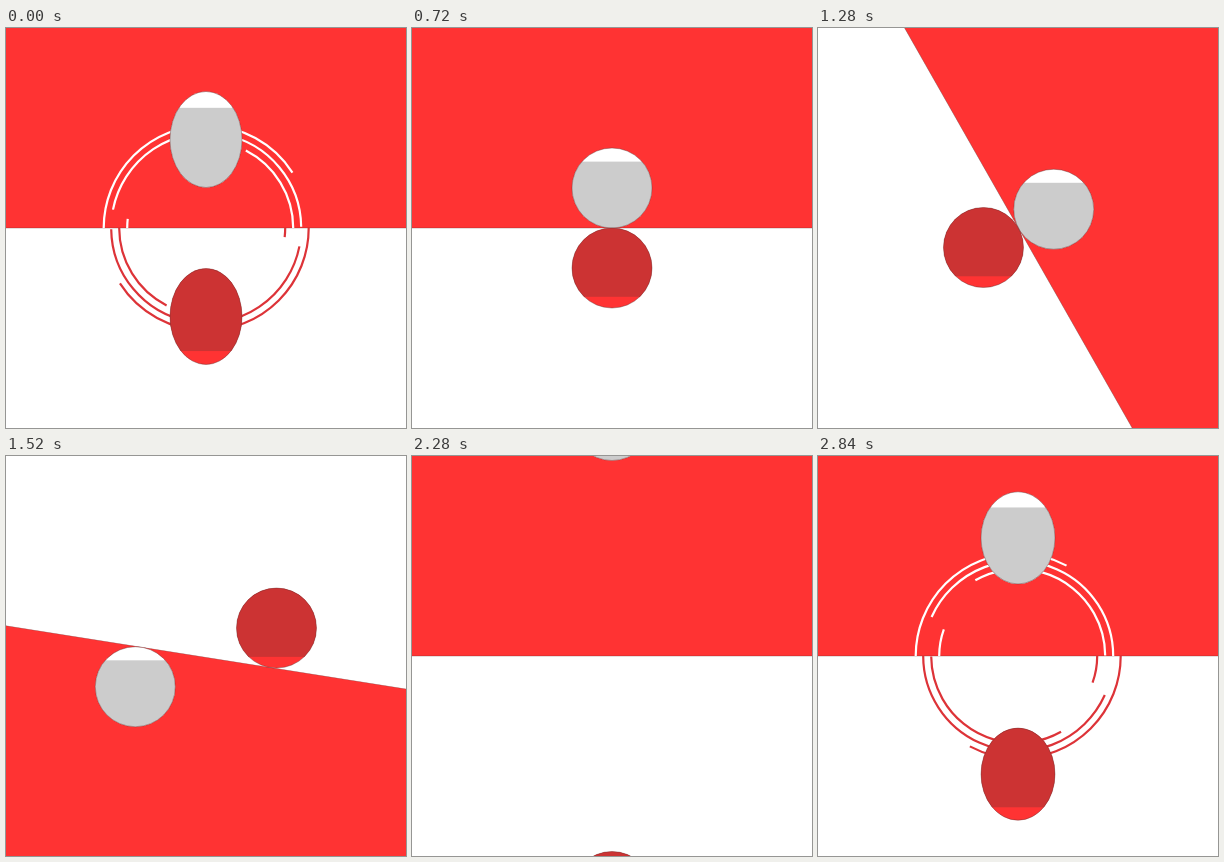
These frames come from a looping animation (400x400 px, 2.88 s). An HTML page with a canvas:

```html
<!DOCTYPE html>
<html lang="en">
<head>
<meta charset="utf-8">
<title>Two balls on a turning line</title>
<style>
  html, body { margin: 0; width: 100%; height: 100%; overflow: hidden; background: #fff; }
  canvas { display: block; width: 400px; height: 400px; }
</style>
</head>
<body>
<canvas id="stage" width="400" height="400"></canvas>
<script>
const ctx = document.getElementById('stage').getContext('2d');
const LOOP = 2880, STEP = 40;
const RADIUS = 40;
const PIVOT = .7;        // the line turns about a point just below its rest height
const DROP = 2240;       // the fall and the rings run on a clock starting here
const ROLL = 720, SWING = 960, EXIT = 1960;
const RED = '#f33', DARK_RED = '#c33', RING_RED = '#dd3338', GREY = '#ccc';
const EDGE = 'rgba(90,45,45,.5)';

// Each ring arc sweeps half a turn; its tail follows its head.
const RINGS = [
  { r: 79, dir: -1, head: -100, tail: 253 },
  { r: 87, dir: 1, head: 2, tail: 346 },
  { r: 95, dir: -1, head: 157, tail: 536 },
  { r: 102.5, dir: 1, head: 214, tail: 596 },
];
const HEAD_SWEEP = 720, TAIL_SWEEP = 550;

const clamp = x => Math.min(1, Math.max(0, x));
const mix = (a, b, p) => a + (b - a) * p;
const sineInOut = p => (1 - Math.cos(Math.PI * p)) / 2;
const quadOut = p => 1 - (1 - p) ** 2;
const quintInOut = p => p < .5 ? 16 * p ** 5 : 1 - 16 * (1 - p) ** 5;

// Tilt of the dividing line in radians.
function tiltAt(t) {
  if (t <= ROLL || t >= EXIT) return 0;
  const s = t - SWING;
  let degrees;
  if (s < 0) degrees = -2 * sineInOut((t - ROLL) / (SWING - ROLL));
  else if (s < 650) degrees = -2 + 6.09e-4 * s * s;
  else degrees = 360 - 104.7 * ((1000 - s) / 350) ** 2.62;
  return degrees * Math.PI / 180;
}

// Position of the upper ball along the line.
function rollAt(t) {
  if (t < SWING) return -30.5 * sineInOut((t - ROLL) / (SWING - ROLL));
  return -30.5 + 305 * ((t - SWING) / 1000) ** 2;
}

// Scale and bottom edge of the upper ball while it falls and lands.
function fallAt(u) {
  const impact = 683, squashed = 783, rest = 1080;
  if (u < impact) {
    const p = Math.max(0, (u - 40) / 600);
    const stretch = .2 * p ** 4;
    return { sx: 1 - stretch / 2, sy: 1 + stretch, bottom: Math.min(200, 4.5 + 155 * p ** 3.3) };
  }
  const hit = quadOut(clamp((u - impact) / (squashed - impact)));
  const back = quadOut(clamp((u - squashed) / (rest - squashed)));
  return {
    sx: u < squashed ? mix(.885, 1.16, hit) : mix(1.16, 1, back),
    sy: u < squashed ? mix(1.23, .84, hit) : mix(.84, 1, back),
    bottom: 200,
  };
}

function drawHalves(tilt) {
  ctx.fillStyle = '#fff';
  ctx.fillRect(0, 0, 400, 400);
  ctx.save();
  ctx.translate(200, 200 + PIVOT);
  ctx.rotate(tilt);
  ctx.translate(0, -PIVOT);
  ctx.fillStyle = RED;
  ctx.fillRect(-400, -400, 800, 400);
  ctx.fillStyle = EDGE;
  ctx.fillRect(-400, -.3, 800, .6);
  ctx.restore();
}

function drawRings(u) {
  ctx.lineWidth = 2.2;
  for (const { r, dir, head, tail } of RINGS) {
    const h = quintInOut(clamp((u - head) / HEAD_SWEEP));
    const g = quintInOut(clamp((u - tail) / TAIL_SWEEP));
    if (h - g < .006) continue;
    const [from, to] = dir > 0 ? [g, h] : [1 - h, 1 - g];
    for (const turn of [1, 0]) {
      ctx.strokeStyle = turn ? '#fff' : RING_RED;
      ctx.beginPath();
      ctx.arc(200.2, 200, r, Math.PI * (turn + from), Math.PI * (turn + to));
      ctx.stroke();
    }
  }
}

// Shading stays upright: lit band at the top or at the bottom.
function drawBall(x, y, sx, sy, light, shade, shadeFrom, shadeTo) {
  const rx = RADIUS * sx, ry = RADIUS * sy;
  ctx.save();
  ctx.beginPath();
  ctx.ellipse(x, y, rx, ry, 0, 0, 2 * Math.PI);
  ctx.fillStyle = light;
  ctx.fill();
  ctx.save();
  ctx.clip();
  ctx.fillStyle = shade;
  ctx.fillRect(x - rx, y - ry + 2 * ry * shadeFrom, 2 * rx, 2 * ry * (shadeTo - shadeFrom));
  ctx.restore();
  ctx.strokeStyle = EDGE;
  ctx.lineWidth = .8;
  ctx.stroke();
  ctx.restore();
}

function drawPair(cy, dx, dy, sx, sy) {
  drawBall(200 + dx, cy + dy, sx, sy, '#fff', GREY, .17, 1);
  drawBall(200 - dx, cy - dy, sx, sy, RED, DARK_RED, 0, .86);
}

function draw(t) {
  const tilt = tiltAt(t);
  drawHalves(tilt);
  if (t >= EXIT && t < DROP + STEP) return;

  if (t >= ROLL && t < EXIT) {
    const x = rollAt(t), cos = Math.cos(tilt), sin = Math.sin(tilt);
    const cx = PIVOT * sin, cy = 200 + PIVOT * (1 - cos);
    ctx.save();
    ctx.translate(cx, 0);
    drawPair(cy, x * cos + RADIUS * sin, x * sin - RADIUS * cos, 1, 1);
    ctx.restore();
    return;
  }

  const u = (t - DROP + LOOP) % LOOP;
  if (u < 1080) drawRings(u);
  const { sx, sy, bottom } = fallAt(u);
  drawPair(200, 0, bottom - RADIUS * sy - 200, sx, sy);
}

const start = performance.now();
function tick() {
  const t = (performance.now() - start) % LOOP;
  draw(Math.floor(t / STEP) * STEP);
  requestAnimationFrame(tick);
}
tick();
</script>
</body>
</html>
```
